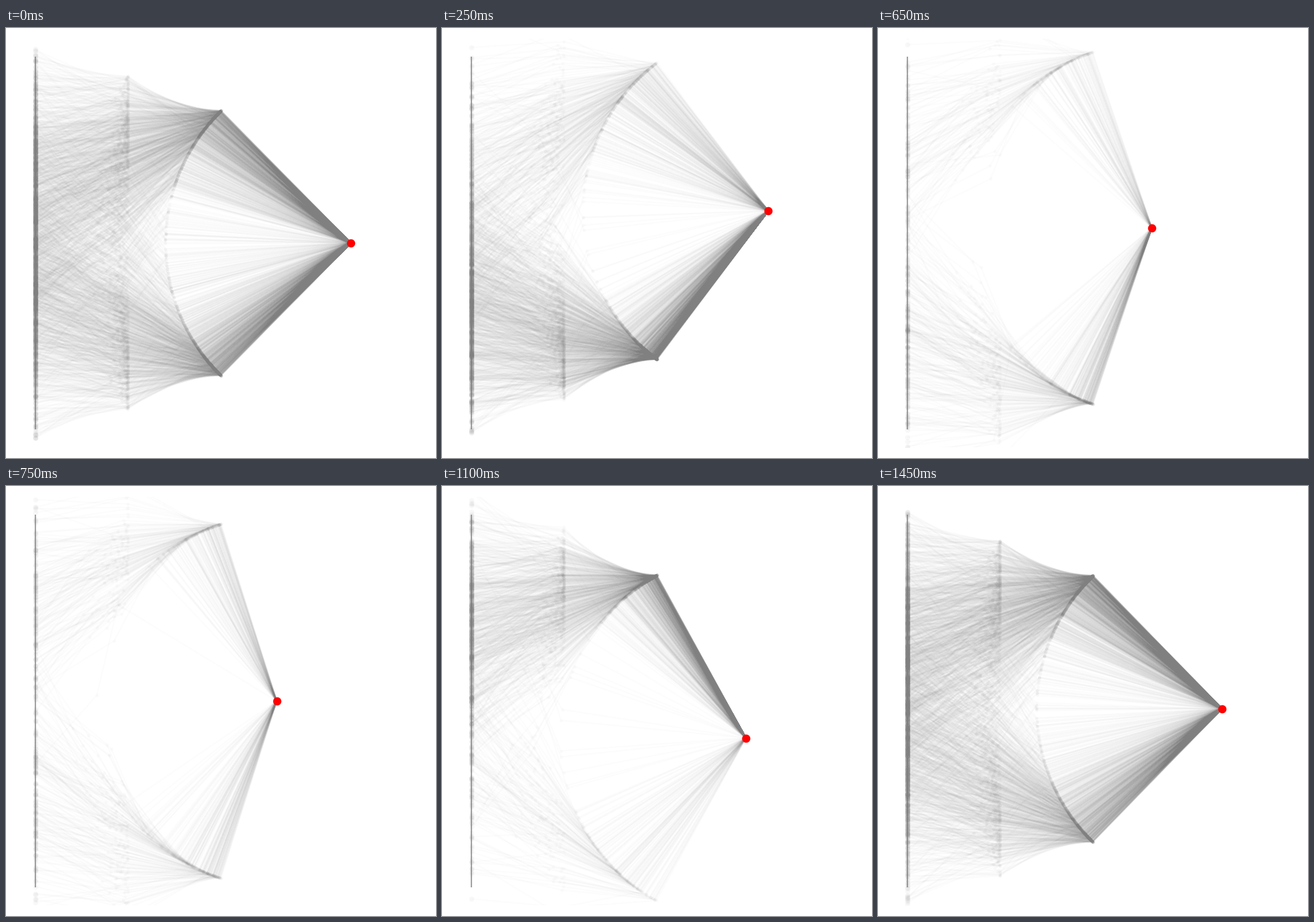
Write a matplotlib script that moves like this. It is 600 px wide and 600 px high and loops after 1.5 s.

```python
import numpy as np
import matplotlib.pyplot as plt
from matplotlib.animation import FuncAnimation
from matplotlib.collections import LineCollection

# Arm on a vertical rail with links 0.5, 0.5 and 1, conditioned on its tip.
FRAMES, INTERVAL = 30, 50
MAX_ARMS = 2100
SIGMA_RAIL, SIGMA_A, SIGMA_B, SIGMA_C = 0.3, 0.36, 0.3, 0.55
PX = 0.72  # points per pixel at 100 dpi

rng = np.random.default_rng(7)
u_tip, u_bend = rng.random((2, MAX_ARMS))
turn = (np.arange(240) + 0.5) * 2 * np.pi / 240


def target(i):
    t = 2 * np.pi * i / FRAMES
    return 1.5 + 0.2 * np.cos(t), 0.2 * np.sin(t)


def solve(x, y, c, theta):
    """Link angles and rail height that put the tip at (x, y)."""
    m = np.clip(x - np.cos(c), -1, 1)
    span = np.arccos(m)
    p = span * np.cos(theta)
    q = np.arccos(np.clip(m / np.cos(p), -1, 1)) * np.sign(np.sin(theta))
    rail = y - np.sin(p) * np.cos(q) - np.sin(c)
    return span, p, q, rail


def density(x, y, c, theta):
    span, p, q, rail = solve(x, y, c, theta)
    a, b = p + q, p - q
    cost = ((rail / SIGMA_RAIL) ** 2 + (a / SIGMA_A) ** 2
            + ((b - a) / SIGMA_B) ** 2 + ((c - b) / SIGMA_C) ** 2)
    area = span * np.abs(np.sin(theta)) / (np.cos(p) * np.abs(np.sin(q)) + 1e-9)
    return np.exp(-cost / 2) * area


def tip_grid(x, y):
    """Cell edges of the last link's angle and the density on the grid."""
    c_max = np.arccos(x - 1)
    edges = np.linspace(-c_max, c_max, 241)
    mids = (edges[1:] + edges[:-1]) / 2
    return edges, density(x, y, mids[:, None], turn[None, :])


def evidence(x, y):
    edges, w = tip_grid(x, y)
    return w.sum() * (edges[1] - edges[0])


MAX_EVIDENCE = max(evidence(*target(i)) for i in range(FRAMES))


def poses(x, y):
    """Arms from the posterior; unlikely targets get fewer of them."""
    count = int(MAX_ARMS * np.sqrt(evidence(x, y) / MAX_EVIDENCE))
    edges, w = tip_grid(x, y)

    total = np.concatenate([[0], np.cumsum(w.sum(axis=1))])
    c = np.interp(u_tip[:count], total / total[-1], edges)

    row = np.clip(np.searchsorted(edges, c) - 1, 0, len(w) - 1)
    cdf = np.cumsum(w, axis=1)
    cdf = np.pad(cdf / cdf[:, -1:], ((0, 0), (1, 0)))[row]
    u = u_bend[:count]
    k = np.clip((cdf < u[:, None]).sum(axis=1) - 1, 0, len(turn) - 1)
    n = np.arange(count)
    low, high = cdf[n, k], cdf[n, k + 1]
    part = (u - low) / np.maximum(high - low, 1e-12)
    theta = (k + part) * 2 * np.pi / len(turn)

    _, p, q, rail = solve(x, y, c, theta)
    a, b = p + q, p - q
    base = np.column_stack([np.zeros(count), rail])
    elbow = base + 0.5 * np.column_stack([np.cos(a), np.sin(a)])
    wrist = elbow + 0.5 * np.column_stack([np.cos(b), np.sin(b)])
    tip = np.tile([x, y], (count, 1))
    return np.stack([base, elbow, wrist, tip], axis=1)


fig = plt.figure(figsize=(6, 6), dpi=100, facecolor="white")
ax = fig.add_axes([0.025, 0.025, 0.95, 0.95])
ax.set_xlim(-0.1, 2.1)
ax.set_ylim(-1.1, 1.1)
ax.axis("off")

ax.plot([0, 0], [-1, 1], color="gray", lw=2 * PX, alpha=0.7, zorder=1)
arms = LineCollection([], colors="gray", linewidths=2 * PX, alpha=0.018,
                      joinstyle="round", zorder=2)
ax.add_collection(arms, autolim=False)


def dots(size, alpha):
    return ax.scatter([], [], s=(size * PX) ** 2, color="gray", alpha=alpha,
                      linewidths=0, zorder=3)


joints = [dots(7, 0.055), dots(4.5, 0.03), dots(4.5, 0.03)]
tip_dot, = ax.plot([], [], "o", color="red", ms=11.5 * PX, mew=0, zorder=4)


def draw(i):
    x, y = target(i)
    pose = poses(x, y)
    arms.set_segments(list(pose))
    for k, joint in enumerate(joints):
        joint.set_offsets(pose[:, k])
    tip_dot.set_data([x], [y])
    return [arms, *joints, tip_dot]


anim = FuncAnimation(fig, draw, frames=FRAMES, interval=INTERVAL,
                     repeat=True, repeat_delay=0, blit=False)
plt.show()
```
